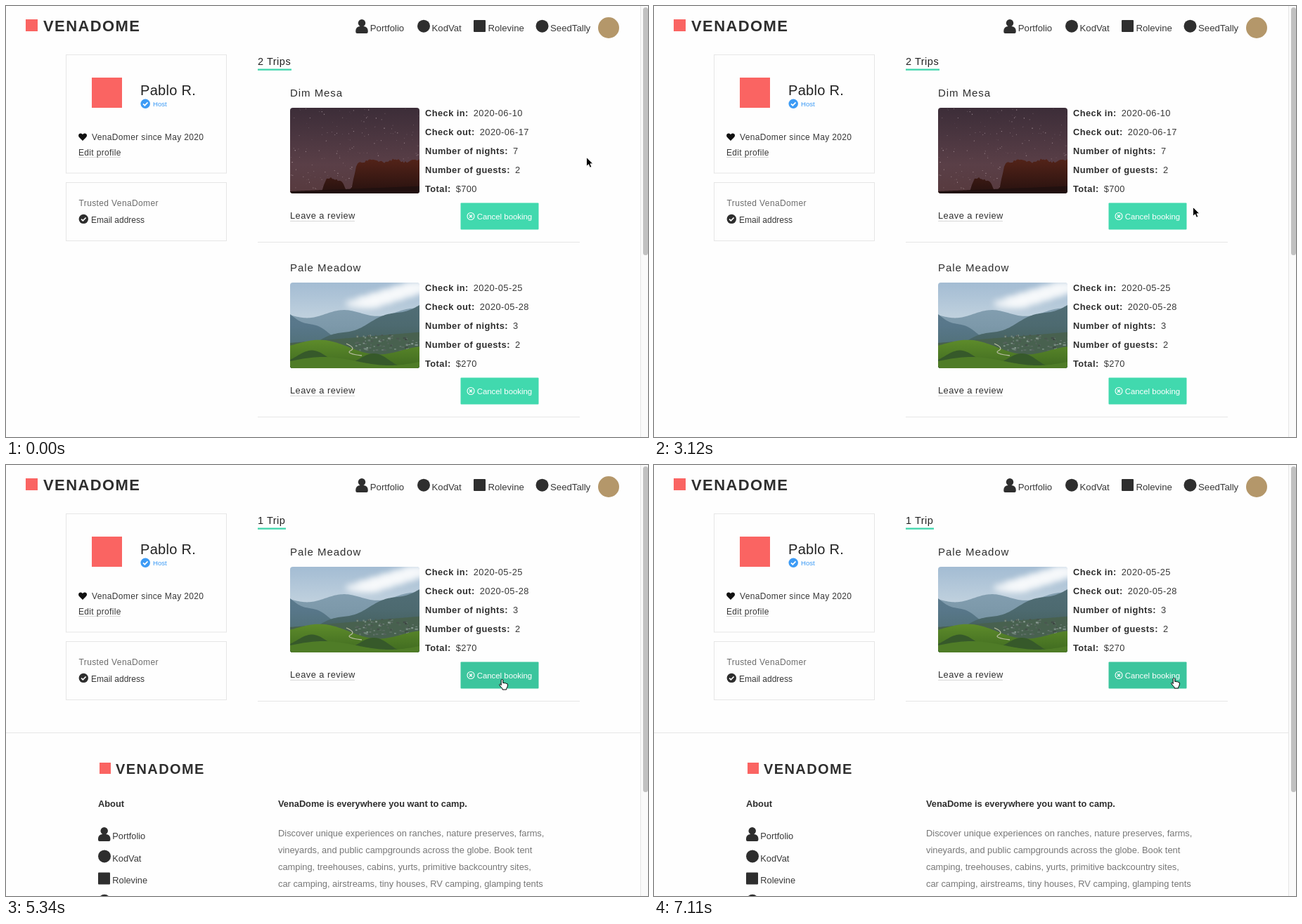
An HTML page with a canvas for the animation above (8000 ms loop, 913x614 px).

```html
<!DOCTYPE html>
<html lang="en">
<head>
<meta charset="utf-8">
<title>Trips</title>
<style>
html, body { margin: 0; width: 100%; height: 100%; overflow: hidden; background: #fefefe; }
canvas, svg { position: absolute; left: 0; top: 0; width: 913px; height: 614px; }
text { font-family: "Liberation Sans", Arial, Helvetica, sans-serif; white-space: pre; }
</style>
</head>
<body>
<canvas id="stage" width="913" height="614"></canvas>
<svg id="overlay" viewBox="0 0 913 614">
  <g id="common"></g>
  <g id="before"></g>
  <g id="after"></g>
  <path id="arrow" d="M.5.5V13.4L3.5 10.7 5.5 15.2 7.8 14.2 5.9 9.8H9.8Z" fill="#000" stroke="#fff" stroke-width=".9"/>
  <path id="hand" d="M3.2 1.8a1.3 1.3 0 0 1 2.6 0V5.6q1.6-.9 2.3.3 1.5-.7 2.2.5 2.2-.4 2.2 1.6 0 3.4-1.8 5.4V15H5V13.6Q3 11.5.9 8.8.3 7.2 1.6 7L3.2 8.6Z" fill="#fff" stroke="#000"/>
</svg>
<script>
const LOOP = 8000, STEP = 148.1, REMOVED = 36, ROW = 249;
const DARK = '#2e2e2e', INK = '#383838', CORAL = '#fa6462', BLUE = '#3d9bf5';
const MINT = '#41d9ae', MINT_HOVER = '#3cc59d', LINE = '#e6e6e6';
const BRAND = 'VenaDome';
const $ = id => document.getElementById(id);
const c = $('stage').getContext('2d');

const nav = [
  { name: 'Portfolio', x: 497.3, icon: person },
  { name: 'KodVat', x: 585, icon: dot },
  { name: 'Rolevine', x: 665, icon: block },
  { name: 'SeedTally', x: 753.5, icon: dot }
];
const fields = ['Check in:', 'Check out:', 'Number of nights:', 'Number of guests:', 'Total:'];
const trips = [
  { name: 'Dim Mesa', values: ['2020-06-10', '2020-06-17', '7', '2', '$700'], photo: desert },
  { name: 'Pale Meadow', values: ['2020-05-25', '2020-05-28', '3', '2', '$270'], photo: valley }
];
const blurb = [
  'Discover unique experiences on ranches, nature preserves, farms,',
  'vineyards, and public campgrounds across the globe. Book tent',
  'camping, treehouses, cabins, yurts, primitive backcountry sites,',
  'car camping, airstreams, tiny houses, RV camping, glamping tents'
];

// ---------- text ----------
function label(x, y, str, size = 12.8, gap = 0, fill = INK, weight = 400) {
  return `<text x="${x}" y="${y}" font-size="${size}" letter-spacing="${gap}" fill="${fill}" font-weight="${weight}">${str}</text>`;
}
const bold = (x, y, str, gap = 0) => label(x, y, str, 12.8, gap, DARK, 700);
const wordmark = (x, y, size) => label(x, y, BRAND.toUpperCase(), size, 1.4, DARK, 700);

function tripText(trip, dy) {
  const rows = fields.map((name, i) => {
    const value = `<tspan dx="7" font-weight="400" fill="${INK}">${trip.values[i]}</tspan>`;
    return bold(596, 156.7 + i * 27 + dy, name + value, .46);
  });
  return label(404, 128.8 + dy, trip.name, 15, .95, DARK) + rows.join('') +
    label(404, 303.3 + dy, 'Leave a review', 12.8, .48, DARK) +
    label(669.7, 303.5 + dy, 'Cancel booking', 11.4, 0, '#fff');
}

function fillText() {
  $('common').innerHTML =
    wordmark(53, 36, 22) +
    nav.map(n => label(n.x + 20.5, 35.8, n.name, 13.2)).join('') +
    label(191, 126.7, 'Pablo R.', 20, .3, '#222') +
    label(209, 142.7, 'Host', 9.6, 0, BLUE) +
    label(122, 191, BRAND + 'r since May 2020', 12, .36) +
    label(103, 213, 'Edit profile', 12, .33) +
    label(103.5, 285, 'Trusted ' + BRAND + 'r', 12, .38, '#6c6c6c') +
    label(121, 308.8, 'Email address', 12);
  $('before').innerHTML = label(358, 83.7, '2 Trips', 14.5, .53, '#222') +
    trips.map((t, i) => tripText(t, i * ROW)).join('');
  $('after').innerHTML = label(358, 83.7, '1 Trip', 14.5, .53, '#222') +
    tripText(trips[1], 0) +
    wordmark(156, 440, 20) +
    bold(131, 487.3, 'About') +
    nav.slice(0, 3).map((n, i) => label(151.3, 533 + i * 31.7, n.name)).join('') +
    bold(387, 487.3, BRAND + ' is everywhere you want to camp.') +
    blurb.map((s, i) => label(387, 528.7 + i * 24, s, 12.85, 0, '#777')).join('');
}

// ---------- shapes ----------
function rect(x, y, w, h, fill) { c.fillStyle = fill; c.fillRect(x, y, w, h); }
function round(x, y, w, h, r, fill) {
  c.fillStyle = fill;
  c.beginPath(); c.roundRect(x, y, w, h, r); c.fill();
}
function disc(x, y, r, fill) {
  c.fillStyle = fill;
  c.beginPath(); c.arc(x, y, r, 0, 7); c.fill();
}
function stroke(d, color, width) {
  c.strokeStyle = color; c.lineWidth = width;
  c.stroke(new Path2D(d));
}

function person(x, y) {
  round(x, y + 10, 17.4, 10, [6, 6, 2, 2], DARK);
  disc(x + 8.7, y + 5.2, 5.2, DARK);
}
function dot(x, y) { disc(x + 9, y + 9.7, 9, DARK); }
function block(x, y) { round(x, y + 1, 17, 17, 1, DARK); }
function check(x, y, fill) {
  disc(x, y, 6.7, fill);
  stroke(`M${x - 3.2} ${y + .2}l2.3 2.3 4.2-4.4`, '#fff', 1.7);
}

// ---------- photos, in a 184 by 122 box ----------
const W = 184, H = 122;
function fade(...colors) {
  const g = c.createLinearGradient(0, 0, 0, H);
  colors.forEach((k, i) => g.addColorStop(i / (colors.length - 1), k));
  return g;
}
function random(seed) {
  return () => (seed = (seed * 16807) % 2147483647) / 2147483647;
}
function ridge(fill, top) {
  c.fillStyle = fill;
  c.beginPath();
  c.moveTo(0, H);
  for (let x = 0; x <= W; x += 2) c.lineTo(x, top(x));
  c.lineTo(W, H);
  c.fill();
}
const rise = x => 1 / (1 + Math.exp(-x / 2));

function desert() {
  const rnd = random(77);
  rect(0, 0, W, H, fade('#3c2d38', '#4b3640', '#5a3f47', '#573a3e'));
  for (let i = 0; i < 190; i++) {
    const size = .5 + rnd() * .7;
    rect(rnd() * W, rnd() * H, size, size, `rgba(225,205,210,${.2 + rnd() * .5})`);
  }
  ridge(fade('#6a2e1c', '#6a2e1c', '#4c2017', '#26110f'), x =>
    120 - 20 * (rise(x - 48) - rise(x - 77)) - 46 * rise(x - 91) + 2 * Math.sin(x / 5) + 3 * rnd());
  ridge('#21100f', x => 119 - x / 25);
}

function valley() {
  const rnd = random(42);
  rect(0, 0, W, H, fade('#a3bcd3', '#c6d5e0', '#e3ebef'));
  c.save();
  c.filter = 'blur(5px)';
  for (let i = 0; i < 6; i++) {
    c.fillStyle = 'rgba(255,255,255,.8)';
    c.beginPath(); c.ellipse(105 + i * 16, 30 - i * 5, 26, 7, 0, 0, 7); c.fill();
  }
  c.restore();
  ridge(fade('#8aa5b8', '#7d99aa', '#66858e'), x => 46 - x / 40 + 5 * Math.sin(x / 16));
  ridge(fade('#607f91', '#58778a', '#4a6a66'), x => 45 + x * .5 + 3 * Math.sin(x / 9));
  ridge(fade('#55717c', '#4d6a70', '#3c5648'), x => 99 - x * .37 + 3 * Math.sin(x / 12));
  ridge('#48614f', x => 86 - x / 12);
  for (let i = 0; i < 90; i++) {
    rect(92 + rnd() * 92, 74 + rnd() * 22, 1.5 + rnd() * 3, 1 + rnd() * 1.6, `hsl(150 8% ${25 + rnd() * 32}%)`);
  }
  ridge(fade('#4f7a2e', '#6d9c30', '#3f6a20'), x => 87 + x * .06 - 8 * Math.cos((x - 46) / 24));
  ridge('#36592a', x => 104 + x * .05 - 9 * Math.cos((x - 32) / 14));
  ridge('#4f7c27', x => 112 - 6 * Math.sin(x / 30));
  stroke('M80 87Q94 93 86 97T102 104', '#b7bca0', 1.3);
}

// ---------- page ----------
function tripShapes(trip, dy, hover) {
  c.save();
  c.translate(404, 145 + dy);
  c.beginPath(); c.roundRect(0, 0, W, H, 4); c.clip();
  trip.photo();
  c.restore();
  rect(404, 306 + dy, 92, 1, '#d9d9d9');
  round(646.5, 280.5 + dy, 111, 38, 1, hover ? MINT_HOVER : MINT);
  const y = 299.5 + dy;
  c.strokeStyle = '#fff'; c.lineWidth = 1.1;
  c.beginPath(); c.arc(661, y, 5, 0, 7); c.stroke();
  stroke(`M659 ${y - 2}l4 4m0-4l-4 4`, '#fff', 1.2);
  rect(358, 336 + dy, 458, 1, LINE);
}

function drawPage(after, hover) {
  rect(0, 0, 913, 614, '#fefefe');
  rect(28, 19, 17, 17, CORAL);
  nav.forEach(n => n.icon(n.x, 19));
  disc(857, 31, 15, '#b4976a');

  c.strokeStyle = LINE; c.lineWidth = 1;
  c.strokeRect(85.5, 69.5, 228, 168.5);
  c.strokeRect(85.5, 251.5, 228, 83);
  rect(122, 102, 43, 43, CORAL);
  check(198.2, 139.2, BLUE);
  check(110.3, 303.4, DARK);
  c.fillStyle = '#111';
  c.fill(new Path2D('M109 192L104 187C101.5 183.5 105 179 109 183 113 179 117 183.5 114 187Z'));
  rect(103, 215, 60, 1, '#d9d9d9');

  rect(358, 89.5, after ? 40 : 48, 2.3, '#3fd5ac');
  if (after) {
    tripShapes(trips[1], 0, hover);
    rect(0, 381, 902, 1, LINE);
    rect(133, 424, 16, 16, CORAL);
    nav.forEach((n, i) => n.icon(131, 516 + i * 31.7));
  } else {
    trips.forEach((t, i) => tripShapes(t, i * ROW, false));
  }

  rect(902, 0, 11, 614, '#fafafa');
  rect(902, 0, 1, 614, LINE);
  round(906, 2, 7, after ? 464 : 353, 3.5, '#c1c1c1');
}

// ---------- pointer: step, x, y ----------
const path = [
  [0, 825, 215], [2, 825, 215], [3, 844, 222], [6, 843, 222], [13, 788, 228], [17, 774, 230],
  [21, 766, 286], [25, 716, 301], [29, 801, 259], [32, 698, 306], [36, 701, 305],
  [39, 766, 290], [43, 771, 349], [48, 735, 303], [54, 735, 303]
];
function pointer(step) {
  const i = Math.max(1, path.findIndex(p => p[0] >= step));
  const [s0, x0, y0] = path[i - 1], [s1, x1, y1] = path[i];
  const k = (step - s0) / (s1 - s0), e = k * k * (3 - 2 * k);
  return [x0 + (x1 - x0) * e, y0 + (y1 - y0) * e];
}

let shown = '';
function show(t) {
  const step = Math.floor(t / STEP);
  const after = step >= REMOVED;
  const hand = (step >= 32 && step <= 37) || step >= 48;
  const key = `${after} ${hand}`;
  if (key !== shown) {
    shown = key;
    drawPage(after, hand);
    $('before').style.display = after ? 'none' : '';
    $('after').style.display = after ? '' : 'none';
    $('arrow').style.display = hand ? 'none' : '';
    $('hand').style.display = hand ? '' : 'none';
  }
  // the hand rests between its arrival and the removal
  const at = step > 32 && step < REMOVED ? 32 : Math.min(step, 54);
  $(hand ? 'hand' : 'arrow').setAttribute('transform', `translate(${pointer(at)})`);
}

fillText();
const start = performance.now();
function tick() {
  show((performance.now() - start) % LOOP);
  requestAnimationFrame(tick);
}
tick();
</script>
</body>
</html>
```
